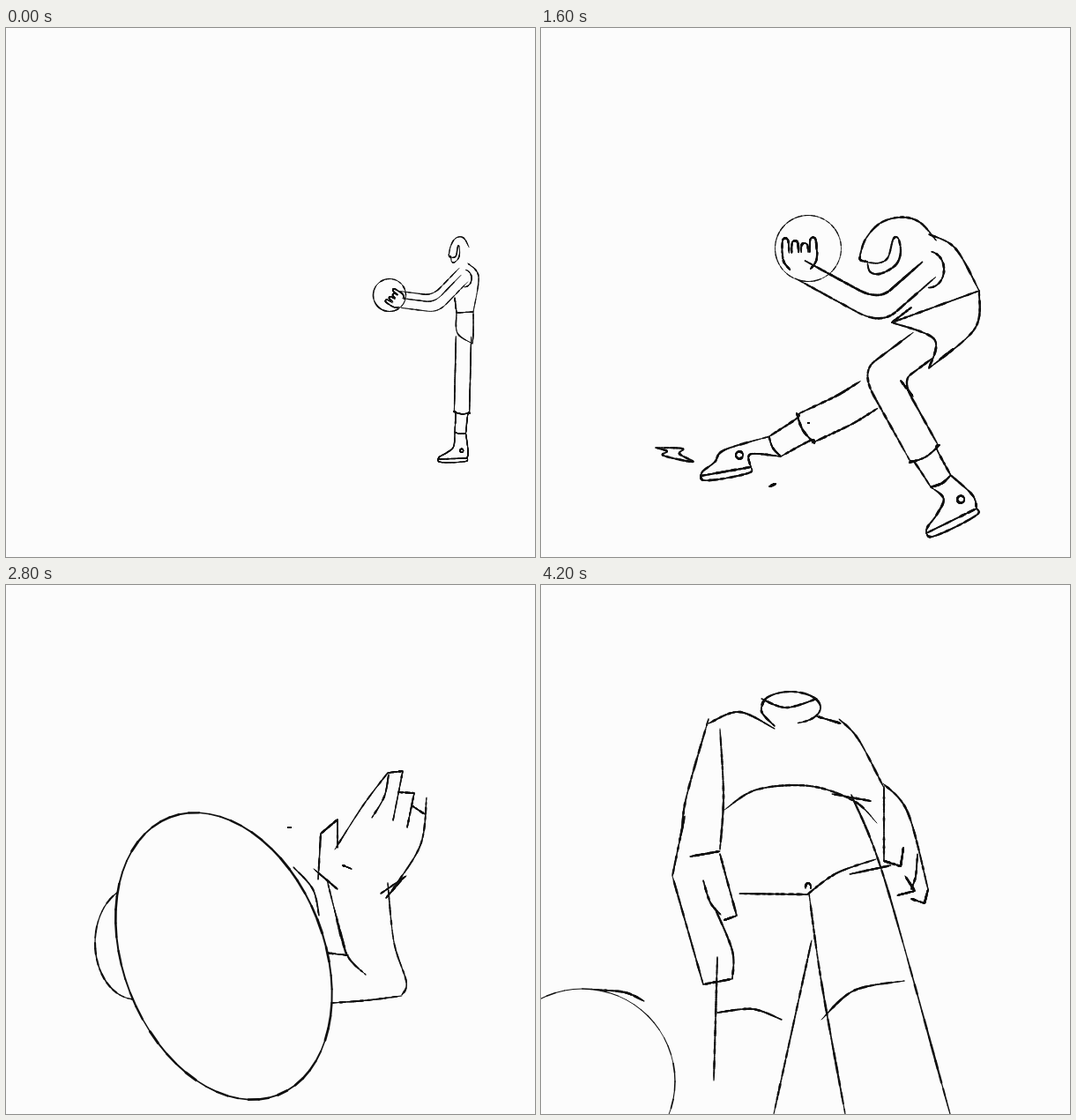
Animation of 600 by 600 pixels, one loop 4.4 s. Source, as an HTML page with a canvas:

```html
<!DOCTYPE html>
<html lang="en">
<head>
<meta charset="utf-8">
<title>Ball player</title>
<style>
html, body { margin: 0; height: 100%; overflow: hidden; background: #fcfcfc; }
canvas { display: block; }
</style>
</head>
<body>
<canvas id="stage" width="600" height="600"></canvas>
<script>
const ctx = document.getElementById('stage').getContext('2d');
const LOOP = 4400, N = 64, TURN = 2 * Math.PI;

// --- Geometry ---
const mix = (a, b, u) => a + (b - a) * u;
const between = (a, b, u) => [mix(a[0], b[0], u), mix(a[1], b[1], u)];
const shift = (p, d, k = 1) => [p[0] + d[0] * k, p[1] + d[1] * k];
const unit = (a, b) => {
  const x = b[0] - a[0], y = b[1] - a[1], l = Math.hypot(x, y) || 1;
  return [x / l, y / l];
};
const normal = ([x, y]) => [-y, x];
const sample = f => Array.from({ length: N + 1 }, (_, i) => f(i / N));
const pairs = n => n.flatMap((x, i) => i % 2 ? [] : [[x, n[i + 1]]]);

function spline(p) {
  const last = p.length - 1;
  return sample(s => {
    const k = Math.min(Math.floor(s * last), last - 1), u = s * last - k;
    const [a, b, c, d] = [k - 1, k, k + 1, k + 2].map(j => p[Math.max(0, Math.min(last, j))]);
    return [0, 1].map(n => b[n] + u / 2 * (c[n] - a[n] + u * (2 * a[n] - 5 * b[n] + 4 * c[n] - d[n]
      + u * (3 * (b[n] - c[n]) + d[n] - a[n]))));
  });
}
const curve = (...n) => spline(pairs(n));
const poly = (...n) => pairs(n).slice(1).map((p, i) => spline([pairs(n)[i], p]));
const arc = ([cx, cy], rx, ry, from = 0, to = TURN, rot = 0) => sample(u => {
  const a = mix(from, to, u), x = rx * Math.cos(a), y = ry * Math.sin(a);
  return [cx + x * Math.cos(rot) - y * Math.sin(rot), cy + x * Math.sin(rot) + y * Math.cos(rot)];
});

// Both edges of a bent limb; the joint is rounded
function tube([a, b, c], [wa, wb, wc]) {
  const n1 = normal(unit(a, b)), n2 = normal(unit(b, c)), n = unit([0, 0], shift(n1, n2));
  const miter = wb / Math.max(.45, n[0] * n1[0] + n[1] * n1[1]);
  return [-1, 1].map(side => {
    const A = shift(a, n1, side * wa), B = shift(b, n, side * miter), C = shift(c, n2, side * wc);
    const P = between(A, B, .72), Q = between(B, C, .28);
    return sample(u => {
      if (u < .4) return between(A, P, u / .4);
      if (u > .6) return between(Q, C, (u - .6) / .4);
      const v = (u - .4) / .2;
      return between(between(P, B, v), between(B, Q, v), v);
    });
  });
}

// --- Side view, built from joints ---
function face([x, y], [w, h]) {
  const at = (...n) => spline(pairs(n).map(p => [x + p[0] * w, y + p[1] * h]));
  return [
    at(.55, -.08, .33, -.4, .08, -.49, -.2, -.39, -.4, -.11, -.48, .19),
    at(-.48, .19, -.47, .27, -.38, .3),
    at(-.38, .31, -.34, .48, -.2, .51, 0, .36, .07, .14, .04, -.11, -.03, -.1, -.1, .22, -.22, .32, -.38, .31)
  ];
}

function hand(wrist, angle, w) {
  const out = [Math.cos(angle), Math.sin(angle)], across = normal(out);
  const at = (u, v) => shift(shift(wrist, out, v * w), across, u * w);
  const fingers = [-1.4, -.45, .5, 1.35].map((u, i) =>
    spline([at(u - .35, 1.7), at(u - .25, 3 - .25 * (i % 3)), at(u + .25, 3 - .25 * (i % 3)), at(u + .35, 1.7)]));
  return [...fingers, ...[-1, 1].map(s => spline([at(s, 0), at(s * 1.6, .8), at(s * 1.75, 1.8)]))];
}

function leg([hip, knee, calf, heel, toe], w) {
  const ankle = between(calf, between(heel, toe, .3), .44);
  const front = normal(unit(calf, ankle)), up = normal(unit(heel, toe));
  const long = Math.hypot(toe[0] - heel[0], toe[1] - heel[1]);
  const sole = (u, v) => shift(between(heel, toe, u), up, v * long);
  const [ankleF, ankleB] = [1, -1].map(s => shift(ankle, front, s * w * .72));
  const [cuffF, cuffB] = [1, -1].map(s => shift(calf, front, s * w * 1.08));
  const side = (cuff, end) => spline([cuff, between(shift(calf, unit(calf, ankle), w * .55), cuff, .75), end]);
  return [
    ...tube([hip, knee, calf], [w, w, w]),
    spline([cuffF, shift(calf, unit(calf, ankle), w * .2), cuffB]),
    side(cuffF, ankleF), side(cuffB, ankleB),
    spline([ankleF, shift(ankle, unit(calf, ankle), w * .15), ankleB]),
    spline([ankleF, sole(.45, .42), sole(.68, .22), sole(.93, .09), toe]),
    spline([ankleB, sole(-.04, .25), heel]),
    spline([heel, toe]), spline([heel, sole(.03, -.1), sole(.5, -.13), sole(.94, -.1), toe]),
    arc(sole(.18, .27), w * .22, w * .22)
  ];
}

function sideView(p) {
  const [nape, back, waistB, waistF, seat, hemB, hem, chest] = pairs(p.torso);
  const arm = pairs(p.arm), w = p.w, limb = tube(arm, [w, w, w]);
  return [
    ...face(p.head, p.size), ...hand(arm[2], p.grip, w), ...limb,
    limb[1].map(q => shift(q, [-2, -8], p.far)),
    arc(arm[0], w * 1.5, w * 1.8, -1.4, 1.6),
    spline([nape, back, waistB]), spline([chest, waistF]), spline([waistF, waistB]),
    spline([waistB, seat, hemB]), spline([waistF, hem, hemB]),
    ...leg(pairs(p.near), w * 1.6), ...leg(pairs(p.rear), w * 1.6)
  ];
}

const straight = [519, 350, 518, 395, 517, 436, 523, 488, 490, 489];
const stand = {
  ink: 1.3, w: 5.4, far: 1, head: [513, 251], size: [22, 29], grip: -2.55, ball: [435, 303, 18.5, 18.5, 0, 1.4],
  torso: [524, 267, 536, 282, 530, 322, 511, 323, 530, 345, 529, 358, 512, 346, 509, 306],
  arm: [520, 284, 488, 317, 449, 312], near: straight, rear: straight
};
const lunge = {
  ink: 1.5, w: 6.4, far: 0, head: [330, 292], size: [25, 30], grip: -1.57, ball: [291, 274, 19.5, 19.5, 0, 1.2],
  torso: [345, 294, 366, 307, 389, 335, 341, 342, 404, 353, 384, 361, 364, 358, 333, 330],
  arm: [341, 309, 314, 337, 293, 281],
  near: [350, 354, 310, 357, 317, 397, 343, 446, 300, 440],
  rear: [393, 357, 430, 396, 479, 391, 530, 368, 536, 418]
};
const land = {
  ink: 2.3, w: 11.4, far: 0, head: [402, 246], size: [84, 64], grip: -1.6, ball: [303, 250, 37.5, 37.5, 0, 1.2],
  torso: [440, 234, 470, 250, 497, 298, 398, 334, 492, 341, 440, 386, 446, 353, 420, 317],
  arm: [440, 274, 384, 323, 294, 274],
  near: [433, 360, 386, 395, 435, 483, 494, 545, 437, 573],
  rear: [372, 416, 345, 433, 300, 454, 238, 498, 181, 508]
};

// --- Seen from above and from the front ---
const reachView = () => [
  arc([157, 206], 36, 54, 3, 5.9),
  curve(127, 205, 131, 222, 143, 229, 150, 226, 158, 232, 185, 226, 190, 206, 196, 205, 201, 222),
  arc([165, 230], 36, 26, .2, 2.9), arc([160, 242], 31, 31, .4, 3), curve(201, 222, 198, 240, 190, 256),
  curve(120, 205, 92, 217, 77, 240, 82, 268, 97, 315, 103, 378), curve(95, 265, 105, 276, 116, 281),
  curve(122, 210, 125, 240, 113, 300, 132, 350),
  ...poly(105, 380, 119, 415, 145, 415, 152, 387), curve(105, 380, 120, 374, 152, 387),
  ...[0, 1, 2].map(i => curve(120 + i * 10, 375 + i, 125 + i * 8, 397)),
  curve(190, 192, 212, 187, 235, 193, 291, 216), curve(215, 240, 235, 253, 270, 257),
  curve(210, 190, 212, 228, 245, 260), curve(245, 264, 241, 295, 232, 330),
  curve(322, 146, 305, 190, 290, 217, 272, 256, 292, 277, 313, 261, 345, 195, 358, 140),
  curve(132, 350, 165, 357, 205, 352, 241, 332),
  curve(120, 340, 150, 380, 195, 387, 235, 372, 254, 350), curve(150, 382, 185, 394, 225, 384, 255, 364),
  curve(210, 383, 250, 421, 285, 426, 299, 410, 285, 372, 240, 322),
  arc([252, 324], 12, 22, 2.6, 6.9, -.65), arc([247, 319], 4, 4)
];

const waveView = () => [
  arc([147, 406], 46, 64),
  curve(364, 334, 372, 366, 386, 418, 408, 442), curve(372, 366, 386, 418), curve(361, 417, 388, 420),
  curve(433, 338, 440, 405, 454, 450, 449, 465), curve(449, 466, 410, 471, 370, 474),
  ...poly(376, 298, 376, 266, 357, 282, 354, 334), curve(349, 322, 376, 345),
  curve(373, 300, 405, 250, 433, 213), ...poly(433, 213, 450, 211, 439, 267), curve(434, 215, 429, 240, 415, 264),
  ...poly(445, 235, 463, 236, 455, 275), curve(460, 250, 475, 260),
  curve(477, 241, 470, 295, 437, 347), curve(425, 350, 454, 330), curve(431, 355, 449, 334),
  curve(382, 318, 392, 322), curve(320, 275, 323, 275), curve(326, 320, 348, 345, 355, 375)
];

// Lower legs repeat with a fixed offset
const shin = (dx, dy) => [
  curve(239, 325, 236, 385, 241, 460, 252, 595), curve(312, 328, 321, 375, 331, 470, 338, 600),
  curve(239, 320, 216, 385, 235, 465), curve(314, 320, 331, 385, 318, 445)
].map(l => l.map(p => shift(p, [dx, 0]))).concat([curve(233, 480, 255, 455, 295, 448, 328, 460).map(p => shift(p, [dx, dy]))]);

const crouchView = () => [
  curve(308, 133, 316, 98, 355, 73, 395, 81, 409, 120, 407, 150, 400, 195, 375, 219, 345, 213, 328, 188),
  curve(324, 148, 335, 133, 353, 175, 375, 186, 403, 180, 403, 190), arc([398, 158], 12, 15, -1.4, 1.2),
  curve(393, 195, 425, 227, 439, 268),
  ...tube([[285, 170], [338, 277], [516, 306]], [29, 29, 15]),
  curve(268, 150, 285, 132, 300, 133, 312, 160), curve(268, 150, 247, 205, 252, 240, 282, 243),
  curve(300, 130, 270, 132, 215, 205, 174, 280),
  curve(500, 291, 535, 288, 550, 302, 552, 328), curve(505, 320, 525, 328, 545, 329),
  arc([189, 352], 60, 60, 1.7, 4.4),
  curve(178, 268, 171, 300, 185, 390, 210, 458, 250, 493), curve(172, 290, 200, 321, 238, 318),
  arc([276, 328], 37, 37, Math.PI, TURN), curve(318, 326, 345, 314, 378, 307),
  ...shin(0, 0), ...shin(118, 20)
];

const walkView = () => [
  arc([283, 139], 34, 18, 3.3, 7.6), curve(250, 129, 278, 139, 313, 129), curve(256, 127, 250, 143, 265, 160),
  curve(190, 157, 225, 144, 265, 163), curve(313, 149, 340, 157),
  curve(190, 152, 165, 240, 160, 278), curve(203, 163, 207, 240, 203, 300),
  ...poly(163, 262, 149, 330, 184, 453, 216, 447), curve(217, 447, 217, 415, 197, 366), curve(169, 308, 203, 302),
  curve(203, 305, 211, 335, 222, 375), ...poly(222, 375, 208, 380), curve(184, 335, 192, 360, 204, 374),
  curve(338, 152, 360, 175, 389, 230), ...poly(389, 228, 389, 313, 408, 319, 411, 298),
  curve(388, 225, 416, 258, 439, 345), ...poly(439, 345, 435, 361, 420, 356), curve(427, 305, 425, 330, 420, 345),
  ...poly(413, 330, 424, 347, 404, 352),
  curve(208, 255, 245, 232, 305, 228, 355, 245, 381, 270), curve(330, 237, 374, 245),
  curve(225, 350, 302, 351), curve(302, 351, 335, 327, 380, 311), curve(350, 328, 397, 318), arc([303, 343], 3, 5, 3, 6.5),
  curve(352, 238, 390, 335, 464, 600), curve(304, 350, 318, 450, 345, 600), curve(307, 403, 264, 600),
  curve(200, 422, 196, 562), curve(200, 485, 240, 481, 273, 493), curve(318, 493, 355, 460, 412, 449),
  curve(60, 459, 95, 462, 117, 472)
];

// --- Timeline: keys are [time, pose, [zoom, move x, move y], loose marks] ---
const HOME = [1, 0, 0];
const dust = [
  curve(130, 476, 160, 477, 157, 483, 172, 492, 139, 485, 143, 480, 130, 476),
  curve(259, 520, 266, 517), curve(303, 448, 304, 448), curve(408, 400, 422, 418), curve(452, 376, 468, 364)
];
const aloft = { ink: 1.7, ball: [307, 45, 111, 101, 0, 2.2] };
const thrown = { ink: 1.7, ball: [275, 228, 120, 150, -.15, 2.2] };
const open = { ink: 1.9, ball: [247, 421, 114, 169, -.373, 2.4] };
const bent = { ink: 2.6 };
const tall = { ink: 2.2, ball: [47, 563, 105, 105, 0, 1.4] };

const scenes = [
  { view: sideView, keys: [[0, stand], [300, stand], [800, lunge], [1000, lunge, [1, -202, 0]],
    [1300, lunge, [2.05, -525, -395]], [1600, land, HOME, dust], [1700, land, [1, 8, -20]], [1800, land, [1, -30, -58]]] },
  { view: reachView, front: true, keys: [[2000, aloft, [1.35, 24, -31]], [2200, aloft, [1.1, -44, 10]],
    [2400, aloft], [2500, thrown, [1, 25, 60]]] },
  { view: waveView, front: true, keys: [[2600, open, [1, 20, -78]], [2800, open], [3100, open, [1.1, 22, 40]]] },
  { view: crouchView, keys: [[3200, bent, [1.158, -40, 20]], [3600, bent], [3700, bent, [.889, -6, 31]]] },
  { view: walkView, front: true, keys: [[3800, tall, [1.06, -8, -30]], [4200, tall]] }
];

const blend = (a, b, u) => typeof a === 'number' ? mix(a, b, u)
  : Array.isArray(a) ? a.map((v, i) => blend(v, b[i], u))
  : Object.fromEntries(Object.keys(a).map(k => [k, blend(a[k], b[k], u)]));

// --- Drawing ---
let seed;
const rand = () => (seed = (seed * 16807) % 2147483647) / 2147483647;

// Charcoal line: the width wavers and thins towards open ends
function ink(pts, width, closed) {
  let run = 3, grain = 1;
  for (let i = 1; i < pts.length; i++) {
    const [x, y] = pts[i - 1], [X, Y] = pts[i], u = i / pts.length;
    run += Math.hypot(X - x, Y - y);
    if (run > 2.5) { grain = .6 + .65 * rand(); run = 0; }
    ctx.lineWidth = width * grain * (closed ? 1 : .55 + .45 * Math.min(1, 7 * Math.min(u, 1 - u)));
    ctx.beginPath();
    ctx.moveTo(x, y);
    ctx.lineTo(X, Y);
    ctx.stroke();
  }
}

function drawBall([x, y, rx, ry, rot, width], [zoom, dx, dy]) {
  const at = [x * zoom + dx, y * zoom + dy];
  ctx.beginPath();
  ctx.ellipse(...at, rx * zoom, ry * zoom, rot, 0, TURN);
  ctx.fill();
  ink(arc(at, rx * zoom, ry * zoom, 0, TURN, rot), width, true);
}

function draw(t) {
  seed = t + 77;
  ctx.fillStyle = '#fcfcfc';
  ctx.strokeStyle = '#101010';
  ctx.lineCap = 'round';
  ctx.fillRect(0, 0, 600, 600);
  const { view, front, keys } = scenes.findLast(s => s.keys[0][0] <= t);
  const i = keys.findLastIndex(k => k[0] <= t), a = keys[i], b = keys[i + 1] || a;
  const u = a === b ? 0 : (t - a[0]) / (b[0] - a[0]);
  const pose = blend(a[1], b[1], u), cam = blend(a[2] || HOME, b[2] || HOME, u);
  const marks = a[0] === t && a[3] || [];
  if (pose.ball && !front) drawBall(pose.ball, cam);
  for (const line of [...view(pose), ...marks])
    ink(line.map(([x, y]) => [x * cam[0] + cam[1], y * cam[0] + cam[2]]), pose.ink);
  if (pose.ball && front) drawBall(pose.ball, cam);
}

// Ten drawings a second, some held for longer
function step(ms) {
  const t = Math.floor(ms % LOOP / 100) * 100;
  return t < 400 ? 0 : [900, 1100, 1900, 4300].includes(t) ? t - 100 : t;
}

let shown = -1;
const start = performance.now();
function tick() {
  const t = step(performance.now() - start);
  if (t !== shown) draw(shown = t);
  requestAnimationFrame(tick);
}
tick();
</script>
</body>
</html>
```
